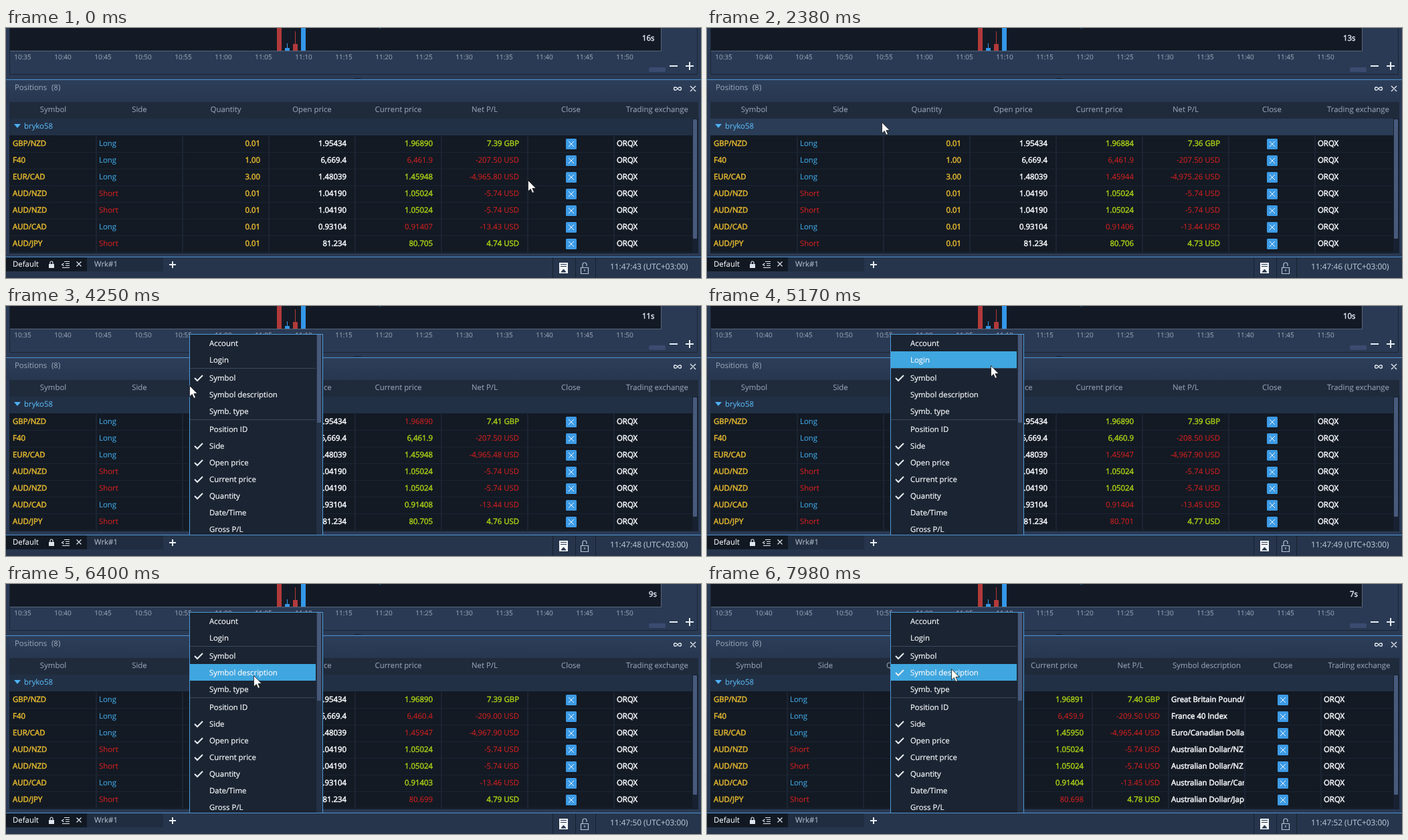
Write an HTML page that moves like this. It is 1039 px wide and 375 px high and loops after 8 s.

```html
<!DOCTYPE html>
<html lang="en">
<head>
<meta charset="utf-8">
<title>Positions panel</title>
<style>
  html, body { margin: 0; width: 100%; height: 100%; overflow: hidden; background: #2a3a54; }
  svg { display: block; width: 1039px; height: 375px; }
  text { font: 11.4px "Open Sans", sans-serif; text-rendering: geometricPrecision; white-space: pre; stroke-width: .1px; }
  .bold { stroke-width: .55px; }
  .menu { stroke-width: .22px; }
  .small { font-size: 10px; }
  .clock { font-size: 11.85px; }
  .line { fill: none; stroke: #e8edf4; stroke-width: 1.5; }
</style>
</head>
<body>
<svg viewBox="0 0 1039 375">
  <defs>
    <linearGradient id="bar" x2="0" y2="1">
      <stop stop-color="#2d3e59"/><stop offset="1" stop-color="#283750"/>
    </linearGradient>
    <clipPath id="menuClip"><path d="M274 42h200v301H274z"/></clipPath>
    <clipPath id="descClip"><path d="M690 160h113v178H690z"/></clipPath>
  </defs>
  <rect width="1039" height="375" fill="#2a3a54"/>

  <!-- chart -->
  <path d="M5.500 0v69.500h1028V0" fill="none" stroke="#1a2534"/>
  <path d="M6 0h973v34H6z" fill="#131a25"/>
  <path d="M6 34.500h973.500V0" fill="none" stroke="#58657a"/>
  <path d="M405 0h7v34h-7zM429 24h7v10h-7zM432 5h1v19h-1z" fill="#b23a3a"/>
  <path d="M417 30h7v4h-7zM420 23h1v7h-1zM441 0h7v34h-7z" fill="#3497e8"/>
  <path d="M558 0h3v1h-3z" fill="#1d4a70"/>
  <rect x="961" y="59" width="25" height="7" rx="2" fill="#3b4b70"/>
  <path class="line" style="stroke-width:2" d="M992 57h12M1016 57h12M1022 51v12"/>
  <g id="axis"></g>

  <!-- panel title -->
  <path d="M521 75h10v1h-10z" fill="#1b2636"/>
  <path d="M0 77.500h1039" stroke="#4f93d2"/>
  <rect y="78" width="1039" height="33" fill="url(#bar)"/>
  <path class="line" style="stroke-width:1.300" d="M1004 91c-2-3-5.500-3-5.500 0s3.500 3 5.500 0 5.500-3 5.500 0-3.500 3-5.500 0M1023 87l8 8m0-8l-8 8"/>

  <g id="table"></g>
  <path d="M1026 136h9v202h-9z" fill="#172130"/>
  <rect x="1027" y="137" width="6" height="179" rx="1" fill="#485a7c"/>

  <!-- status bar -->
  <path d="M0 338h1039v5H0z" fill="#2a3a54"/>
  <path d="M0 343.500h1039" stroke="#4f93d2"/>
  <path d="M0 344h1039v31H0z" fill="#26354c"/>
  <path d="M0 344h121v21H0z" fill="#111822"/>
  <path d="M121 344h114v21H121z" fill="#202d41"/>
  <path d="M817.500 344v31M851.500 344v31M881.500 344v31" stroke="#182231"/>
  <path d="M64 354h8v6h-8z" fill="#dfe5ed"/>
  <path class="line" style="stroke-width:1.100" d="M66 354v-2a2 2 0 0 1 4 0v2M87 350.500h8M89 353.500h6M89 356.500h6M84 359.500h11M86.500 353l-3 2 3 2M105.500 350.500l7 7m0-7l-7 7"/>
  <path class="line" style="stroke-width:2" d="M244 355h10M249 350v10"/>
  <path d="M827 352h13v16h-13z" fill="#f2f5f8"/>
  <path d="M829 354.500h9M829 357.500h9M830 366l3.500-4 3.500 4z" fill="#26354c" stroke="#26354c"/>
  <path class="line" style="stroke:#b7c2d2;stroke-width:1.200" d="M859.500 359.500h11v9h-11zM862 359v-4a3 3 0 0 1 6 0v2M865 362v3"/>
  <g id="labels"></g>

  <g id="menu" clip-path="url(#menuClip)"></g>
  <path id="cursor" d="M0 0v16.500l3.800-3.600 2.600 6 2.600-1.100-2.600-5.800h5.300z" fill="#fff" stroke="#111" stroke-width=".8"/>
</svg>
<script>
const LOOP = 8000, CHECK_AT = 7200, COLUMN_AT = 7300, MENU_AT = 3400;
const WHITE = '#f4f6f9', YELLOW = '#dfb42f', GREEN = '#a3c516', RED = '#d3211f',
      BLUE = '#43a9e6', MUTED = '#96a2b4';
const byId = id => document.getElementById(id);
const text = (x, y, value, fill, cls = '', anchor = 'start') =>
  `<text x="${x}" y="${y}" fill="${fill}" stroke="${fill}" class="${cls}" text-anchor="${anchor}">${value}</text>`;
const rect = (x, y, w, h, fill, rx = 0) =>
  `<rect x="${x}" y="${y}" width="${w}" height="${h}" fill="${fill}" rx="${rx}"/>`;

// Quotes: time, direction and price, profit.
const AUDNZD = [[0, '+1.05024', '-5.74 USD']];
const rows = [
  ['GBP/NZD', 'Long', '0.01', '1.95434', 'Great Britain Pound/New Zealand Dollar', [
    [0, '+1.96890', '7.39 GBP'], [1080, '+1.96884', '7.36 GBP'], [3200, '-1.96890', '7.41 GBP'],
    [4310, '+1.96890', '7.39 GBP'], [5600, '-1.96885', '7.36 GBP'], [6250, '+1.96890', '7.39 GBP'],
    [7030, '+1.96891', '7.40 GBP']]],
  ['F40', 'Long', '1.00', '6,669.4', 'France 40 Index', [
    [0, '-6,461.9', '-207.50 USD'], [3250, '+6,461.9', '-207.50 USD'], [4340, '+6,460.9', '-208.50 USD'],
    [5700, '-6,460.4', '-209.00 USD'], [7700, '-6,459.9', '-209.50 USD']]],
  ['EUR/CAD', 'Long', '3.00', '1.48039', 'Euro/Canadian Dollar', [
    [0, '+1.45948', '-4,965.80 USD'], [410, '-1.45944', '-4,975.26 USD'], [3250, '+1.45948', '-4,965.48 USD'],
    [4900, '-1.45947', '-4,967.90 USD'], [7700, '+1.45950', '-4,965.44 USD']]],
  ['AUD/NZD', 'Short', '0.01', '1.04190', 'Australian Dollar/NZ Dollar', AUDNZD],
  ['AUD/NZD', 'Short', '0.01', '1.04190', 'Australian Dollar/NZ Dollar', AUDNZD],
  ['AUD/CAD', 'Long', '0.01', '0.93104', 'Australian Dollar/Canadian Dollar', [
    [0, '-0.91407', '-13.43 USD'], [500, '-0.91406', '-13.44 USD'], [3300, '+0.91408', '-13.44 USD'],
    [4370, '-0.91404', '-13.45 USD'], [5650, '-0.91401', '-13.48 USD'], [6300, '+0.91403', '-13.46 USD'],
    [7030, '+0.91404', '-13.45 USD']]],
  ['AUD/JPY', 'Short', '0.01', '81.234', 'Australian Dollar/Japanese Yen', [
    [0, '+80.705', '4.74 USD'], [1140, '+80.706', '4.73 USD'], [4250, '+80.705', '4.76 USD'],
    [4800, '-80.701', '4.77 USD'], [5800, '-80.699', '4.79 USD'], [7040, '-80.698', '4.78 USD']]]
];
const headers = ['Symbol', 'Side', 'Quantity', 'Open price', 'Current price', 'Net P/L', 'Close', 'Trading exchange'];

const items = ['Account', 'Login', 'Symbol', 'Symbol description', 'Symb. type', 'Position ID', 'Side',
  'Open price', 'Current price', 'Quantity', 'Date/Time', 'Gross P/L'];
const checked = ['Symbol', 'Side', 'Open price', 'Current price', 'Quantity'];
const itemTop = i => 43 + 25 * i + (i > 1 ? 2 : 0) + (i > 4 ? 2 : 0);

const timerTicks = [60, 1080, 2080, 3130, 3950, 4930, 5880, 6860, 7800];
const clockTicks = [30, 980, 1990, 2970, 4070, 4960, 5880, 6870, 7850];
const passed = (ticks, t) => ticks.filter(tick => t >= tick).length;

// Pointer stops: time, x, y.
const path = [
  [1380, 781, 229], [2170, 320, 150], [2380, 262, 142], [2600, 253, 132], [2990, 266, 122],
  [3300, 275, 120], [4520, 275, 120], [5170, 425, 90], [5350, 423, 96], [5890, 390, 230],
  [6130, 386, 218], [6400, 371, 138], [6960, 339, 137], [7050, 336, 136], [7680, 336, 136], [7960, 366, 128]
];
function pointer(t) {
  const next = path.findIndex(stop => stop[0] > t);
  if (next === 0) return path[0].slice(1);
  if (next < 0) return path[path.length - 1].slice(1);
  const [a, b] = [path[next - 1], path[next]];
  const u = (t - a[0]) / (b[0] - a[0]), e = u * u * (3 - 2 * u);
  return [1, 2].map(k => a[k] + (b[k] - a[k]) * e);
}

function drawTable(t, hoverGroup) {
  const wide = t >= COLUMN_AT, width = wide ? 114 : 129;
  const names = wide ? [...headers.slice(0, 6), 'Symbol description', ...headers.slice(6)] : headers;
  const left = i => 6 + width * i;
  const right = i => left(i + 1) - 13;
  const closeCol = wide ? 7 : 6, closeX = left(closeCol) + (wide ? 57 : 65);
  let out = rect(5, 111, 1030, 25, '#1f2b3b') + rect(5, 136, 1021, 25, hoverGroup ? '#2a3c56' : '#223045')
    + rect(5, 161, 1021, 177, '#131a24');
  names.forEach((name, i) => {
    out += text(left(i) + width / 2, 126, name, MUTED, '', 'middle');
    if (i) out += rect(left(i) - 1, 162, 2, 175, '#1b2533');
  });
  out += '<path d="M12 144h10l-5 6z" fill="#4db2f5"/>' + text(27, 151, 'bryko58', '#5ab7f2');
  rows.forEach(([symbol, side, quantity, open, description, quotes], i) => {
    const y = 177 + 25 * i, cy = y - 3;
    const [, price, profit] = quotes.filter(q => t >= q[0]).pop();
    const signed = (col, value, up) =>
      text(right(col), y, value, up ? GREEN : RED, up ? 'bold' : '', 'end');
    out += rect(5, y + 9, 1021, 1, '#1b2533')
      + text(10, y, symbol, YELLOW, 'bold')
      + text(left(1) + 4, y, side, side === 'Long' ? BLUE : RED)
      + text(right(2), y, quantity, YELLOW, 'bold', 'end')
      + text(right(3), y, open, WHITE, 'bold', 'end')
      + signed(4, price.slice(1), price[0] === '+')
      + signed(5, profit, profit[0] !== '-')
      + (wide ? `<g clip-path="url(#descClip)">${text(left(6) + 4, y, description, WHITE, 'bold')}</g>` : '')
      + rect(closeX - 8, cy - 8, 16, 16, '#3d9be6', 1.5)
      + `<path d="M${closeX - 4} ${cy - 4}l8 8m0-8l-8 8" stroke="#e9f4fd"/>`
      + text(left(closeCol + 1) + 4, y, 'ORQX', WHITE, 'bold');
  });
  return out;
}

function drawMenu(t, hovered) {
  if (t < MENU_AT) return '';
  let out = rect(274, 42, 200, 310, '#4f9bd8') + rect(275, 43, 198, 310, '#1a2432')
    + rect(275, 93, 188, 1, '#3a495e') + rect(275, 170, 188, 1, '#3a495e')
    + rect(464, 43, 9, 310, '#243145') + rect(465, 43, 6, 132, '#485878');
  items.forEach((name, i) => {
    const y = itemTop(i);
    if (i === hovered) out += rect(275, y, 188, 25, '#3fa6df');
    if (checked.includes(name) || (i === 3 && t >= CHECK_AT))
      out += `<path class="line" style="stroke-width:2" d="M282 ${y + 13}l4 4 8-8"/>`;
    out += text(304, y + 17, name, WHITE, 'menu');
  });
  return out;
}

function drawLabels(t) {
  const seconds = 16 - passed(timerTicks, t);
  return text(seconds > 9 ? 951 : 961, 19, seconds + 's', '#d9dfe8', 'bold')
    + text(13, 93, 'Positions', MUTED) + text(68, 93, '(8)', MUTED)
    + text(10, 358, 'Default', WHITE) + text(132, 358, 'Wrk#1', '#aebaca')
    + text(903, 362, `11:47:${43 + passed(clockTicks, t)} (UTC+03:00)`, '#b9c4d3', 'clock');
}

byId('axis').innerHTML = Array.from({ length: 16 }, (_, i) => {
  const minutes = 635 + 5 * i;
  const label = `${Math.floor(minutes / 60)}:${String(minutes % 60).padStart(2, '0')}`;
  return text(25 + 60 * i, 47, label, MUTED, 'small', 'middle');
}).join('');

const shown = {};
function update(id, markup) {
  if (shown[id] !== markup) byId(id).innerHTML = shown[id] = markup;
}

function frame() {
  const t = performance.now() % LOOP;
  const [x, y] = pointer(t);
  const hovered = x > 276 && x < 463 ? items.findIndex((_, i) => y >= itemTop(i) && y < itemTop(i) + 25) : -1;
  update('table', drawTable(t, t < MENU_AT && y >= 136 && y < 161));
  update('menu', drawMenu(t, hovered));
  update('labels', drawLabels(t));
  byId('cursor').setAttribute('transform', `translate(${Math.round(x) - .5} ${Math.round(y) - .5})`);
  requestAnimationFrame(frame);
}
frame();
</script>
</body>
</html>
```
